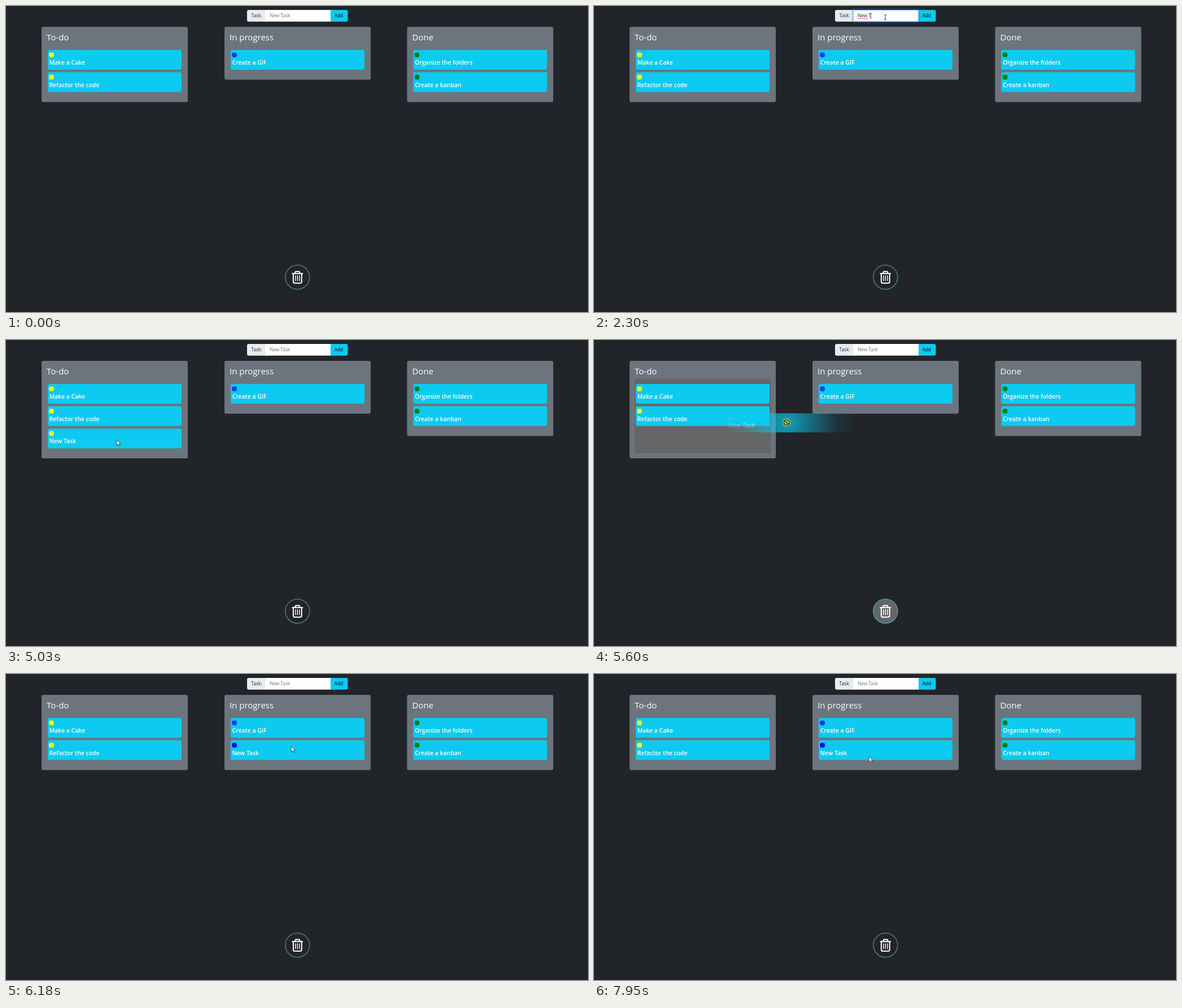
Recreate the animation shown at these times as an HTML page. Size 1031 px wide and 543 px high, loop 8 s.

```html
<!DOCTYPE html>
<html lang="en">
<head>
<meta charset="utf-8">
<title>Kanban board</title>
<style>
html, body { margin: 0; height: 100%; overflow: hidden; background: #212529; }
svg { display: block; width: 100%; height: 100%; font-family: "Open Sans", "Noto Sans", sans-serif; }
.small { font-size: 8.3px; }
.title { font-size: 15px; font-weight: 500; fill: #fff; }
.task { font-size: 10.45px; font-weight: 600; fill: #fff; }
</style>
</head>
<body>
<svg id="stage" viewBox="0 0 1031 543"></svg>
<script>
const stage = document.getElementById('stage');
const LOOP = 8000;
const FOCUS = 760, BLUR = 3720, ADDED = 3890;
const GRAB = 5300, ALL_ZONES = 5840, OVER_ZONE = 6010, DROP = 6180;
const ROW = 39.6;

// Pointer path: time, x, y
const path = [
  [220, 981, 509], [500, 640, 150], [760, 516, 20], [3440, 516, 20],
  [3680, 590, 18], [4120, 590, 18], [4430, 490, 185], [4690, 285, 254],
  [4880, 191, 205], [4970, 196, 177], [5040, 196, 177], [5200, 180, 174],
  [GRAB, 180, 174], [5780, 437, 130], [5950, 493, 121], [DROP, 505, 128],
  [6500, 558, 245], [6650, 558, 245], [6970, 546, 231], [7160, 546, 231],
  [7680, 459, 109], [7940, 487, 146]
];

// Typed text: time, value
const typing = [
  [1570, 'N'], [1655, 'Ne'], [1740, 'New'], [1910, 'New '],
  [2300, 'New T'], [2400, 'New Ta'], [2500, 'New Tas'], [2590, 'New Task']
];

const between = (t, a, b) => t >= a && t < b;
const rect = (x, y, w, h, r, fill, extra = '') =>
  `<rect x="${x}" y="${y}" width="${w}" height="${h}" rx="${r}" fill="${fill}" ${extra}/>`;
const text = (x, y, cls, value, extra = '') =>
  `<text x="${x}" y="${y}" class="${cls}" xml:space="preserve" ${extra}>${value}</text>`;
const line = (x1, y1, x2, y2, color, width) =>
  `<path d="M${x1} ${y1}L${x2} ${y2}" stroke="${color}" stroke-width="${width}"/>`;

function pointerAt(t) {
  if (t < path[0][0]) return null;
  const i = path.findIndex(p => p[0] > t);
  if (i < 0) return path[path.length - 1].slice(1);
  const [t0, x0, y0] = path[i - 1], [t1, x1, y1] = path[i];
  const k = (t - t0) / (t1 - t0);
  return [x0 + (x1 - x0) * k, y0 + (y1 - y0) * k];
}

function card(x, y, name, color) {
  return rect(x, y, 237, 35, 3, '#0dcaf0') +
    rect(x + 2.3, y + 4.4, 8.6, 8.6, 3.4, color) +
    text(x + 2.7, y + 26, 'task', name);
}

// A null task keeps its slot but is not drawn.
function column(x, title, tasks, dark) {
  const height = 54.2 + ROW * tasks.length;
  return rect(x, 37, 259, height, 3, '#6c757d') +
    (dark ? rect(x + 9, 69, 241.5, height - 41, 3, '#666') : '') +
    text(x + 9, 61.3, 'title', title) +
    tasks.map((task, i) => task ? card(x + 11, 78 + ROW * i, ...task) : '').join('');
}

function board(t) {
  const todo = [['Make a Cake', '#ff0'], ['Refactor the code', '#ff0']];
  const doing = [['Create a GIF', '#0a38f8']];
  const done = [['Organize the folders', 'green'], ['Create a kanban', 'green']];
  if (between(t, ADDED, OVER_ZONE)) todo.push(t < GRAB ? ['New Task', '#ff0'] : null);
  if (t >= OVER_ZONE) doing.push(t < DROP ? null : ['New Task', '#00f']);
  const dark = between(t, ALL_ZONES, DROP);
  return column(63, 'To-do', todo, between(t, GRAB, DROP)) +
    column(387, 'In progress', doing, dark) +
    column(710.5, 'Done', done, dark);
}

function form(t, pointer) {
  const focused = between(t, FOCUS, BLUR);
  const typed = typing.filter(([time]) => time <= t).pop();
  const value = typed && t < ADDED ? typed[1] : '';
  const hover = pointer && kindAt(pointer) === 'hand';
  const button = hover ? (between(t, BLUR, ADDED) ? '#3dd5f3' : '#31d2f2') : '#0dcaf0';
  let out = rect(427, 7, 36, 20.7, 3, '#e9ecef') +
    rect(571, 7, 34.5, 20.7, 3, button) +
    rect(459.5, 7, 115.5, 20.7, 0, '#fff') +
    text(434.5, 20.3, 'small', 'Task:', 'fill="#212529"') +
    text(581.7, 20.3, 'small', 'Add', 'fill="#000"');
  if (focused) {
    out += rect(458.2, 5.7, 118.1, 23.3, 1.5, 'none', 'stroke="#0d6efd" stroke-opacity=".3" stroke-width="2.8"') +
      rect(459.9, 7.4, 114.7, 19.9, 0, 'none', 'stroke="#86b7fe" stroke-width=".8"');
  }
  out += text(467, 20.3, 'small', value || 'New Task', `id="field" fill="${value ? '#212529' : '#6c757d'}"`);
  if (focused && t >= 1910) out += line(467, 22.4, 485, 22.4, '#e33', 0.8);
  if (focused && t >= 2760) out += line(488, 22.4, 504, 22.4, '#e33', 0.8);
  const caret = focused && !between(t, 1290, 1570) && t < 3210;
  return { out, caret, value };
}

function trash(dark) {
  return `<g fill="none" stroke="#fff" stroke-linecap="round" stroke-linejoin="round">
    <circle cx="516.3" cy="481.2" r="21.5" fill="${dark ? '#666' : 'none'}" stroke="${dark ? '#3d9dbd' : '#4a7889'}" stroke-width="1.5"/>
    <path d="M507.3 474.8H525.3M511.7 474.5L513 471.2H519.6L520.9 474.5M508.9 475.3V489Q508.9 491.8 511.7 491.8H520.9Q523.7 491.8 523.7 489V475.3" stroke-width="2"/>
    <path d="M512.8 478.5V487.5M516.3 478.5V487.5M519.8 478.5V487.5" stroke-width="1.4"/></g>`;
}

// The dragged card fades out away from the pointer.
function ghost([x, y]) {
  return `<defs><radialGradient id="fade" gradientUnits="userSpaceOnUse" cx="106" cy="17" r="125">
    <stop offset="0" stop-color="#fff" stop-opacity=".75"/>
    <stop offset=".35" stop-color="#fff" stop-opacity=".42"/>
    <stop offset=".7" stop-color="#fff" stop-opacity=".1"/>
    <stop offset="1" stop-color="#fff" stop-opacity="0"/></radialGradient>
    <mask id="glow" maskUnits="userSpaceOnUse" x="0" y="0" width="237" height="35">
    ${rect(0, 0, 237, 35, 0, 'url(#fade)')}</mask></defs>
    <g transform="translate(${x - 106} ${y - 17})"><g mask="url(#glow)">${card(0, 0, 'New Task', '#ff0')}</g>
    ${text(2.7, 26, 'task', 'New Task', 'opacity=".18"')}</g>`;
}

function kindAt([x, y]) {
  if (y < 7 || y > 28) return 'arrow';
  return between(x, 459, 575) ? 'beam' : between(x, 575, 606) ? 'hand' : 'arrow';
}

const shapes = {
  arrow: '<path d="M0 0V10L2.4 7.9 4.1 11.5 5.6 10.8 4 7.3H7Z" fill="#fff" stroke="#111" stroke-width=".7"/>',
  beam: '<path d="M-2 -4.5Q0 -4.5 0 -3.5 0 -4.5 2 -4.5M0 -3.5V3.5M-2 4.5Q0 4.5 0 3.5 0 4.5 2 4.5" fill="none" stroke="#222" stroke-width=".9"/>',
  hand: '<path d="M-1 -.5Q0 -1.5 1 -.5V3.7L5 4.7Q6 5.3 5.6 7.5L4.6 10.7H-.6L-3.4 6.5Q-2.8 4.8 -1 6.2Z" fill="#fff" stroke="#111" stroke-width=".7"/>',
  denied: '<circle r="4.8" fill="none" stroke="#222" stroke-width="1.3"/><path d="M-3.3 -3.3L3.3 3.3" stroke="#222" stroke-width="1.3"/>'
};

function cursor(t, pointer) {
  const pressed = between(t, FOCUS, 880) || between(t, BLUR, ADDED) || between(t, GRAB - 60, DROP);
  const kind = between(t, GRAB, OVER_ZONE) ? 'denied' : kindAt(pointer);
  return `<g transform="translate(${pointer})">` +
    (pressed ? '<circle r="7" fill="#ee0" opacity=".62"/>' : '') + shapes[kind] + '</g>';
}

function render(t) {
  const pointer = pointerAt(t);
  const { out, caret, value } = form(t, pointer);
  const dragging = between(t, GRAB, DROP);
  stage.innerHTML = board(t) + out + trash(dragging) +
    (dragging ? ghost(pointer) : '') + (pointer ? cursor(t, pointer) : '');
  if (caret) {
    const width = value ? document.getElementById('field').getComputedTextLength() : 0;
    const x = 466.6 + width;
    stage.insertAdjacentHTML('beforeend', line(x, 11.5, x, 23, '#212529', 0.8));
  }
}

function tick() {
  render(performance.now() % LOOP);
  requestAnimationFrame(tick);
}
tick();
</script>
</body>
</html>
```
